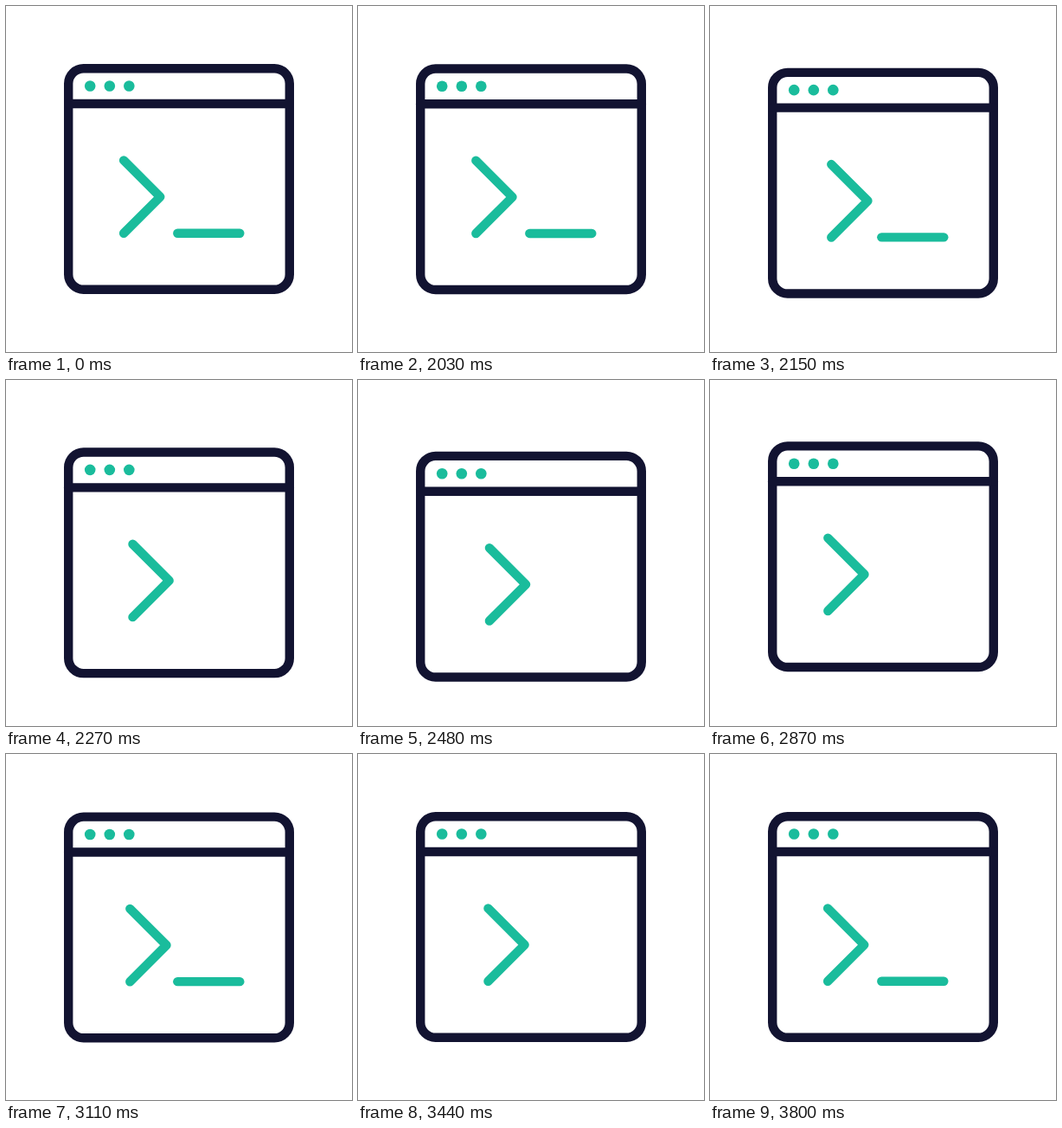
These frames come from a looping animation (400 by 400 pixels, 3.86 s). An HTML page:

```html
<!DOCTYPE html>
<html lang="en">
<head>
<meta charset="utf-8">
<title>Console</title>
<style>
  html, body { margin: 0; width: 100%; height: 100%; overflow: hidden; background: #fff; }
  svg { display: block; width: 100vw; height: 100vh; }
  .line { fill: none; stroke-width: 10.4; stroke-linecap: round; stroke-linejoin: round; }
  .dark { stroke: #121331; }
  .accent { stroke: #1abc9c; }
  .dots { fill: #1abc9c; }
</style>
</head>
<body>
<svg viewBox="0 0 400 400">
  <g id="console">
    <rect class="line dark" x="72.2" y="72.2" width="255.6" height="255.6" rx="17.5"/>
    <path class="line dark" d="M72.2 113H327.8"/>
    <g class="dots">
      <circle cx="97.2" cy="92.5" r="6.3"/>
      <circle cx="119.8" cy="92.5" r="6.3"/>
      <circle cx="142.3" cy="92.5" r="6.3"/>
    </g>
    <path id="prompt" class="line accent" d="M136.1 178.4L178.3 220.6L136.1 262.8"/>
    <path id="cursor" class="line accent" d="M198.3 262.7H270.3"/>
  </g>
</svg>
<script>
  const LOOP = 3860, REST = 2000, STEP = 30, LAST = 60;
  const TRAVEL = 16;
  const DROP = 14;      // steps until the window is lowest
  const RISE = 27.5;    // steps it takes to come back
  const SWING = 15;     // steps for the prompt to go one way
  const BLINK = 8.25;   // steps between cursor changes

  const byId = id => document.getElementById(id);
  const win = byId('console'), prompt = byId('prompt'), cursor = byId('cursor');

  const clamp = p => Math.min(1, Math.max(0, p));
  const smooth = p => p * p * (3 - 2 * p);

  // Cubic bezier easing with control points (x1, 0) and (x2, 1)
  function ease(p, x1, x2) {
    let lo = 0, hi = 1;
    for (let i = 0; i < 24; i++) {
      const s = (lo + hi) / 2, r = 1 - s;
      const x = 3 * r * r * s * x1 + 3 * r * s * s * x2 + s * s * s;
      if (x < p) lo = s; else hi = s;
    }
    return smooth(lo);
  }

  function windowY(k) {
    if (k <= DROP) return TRAVEL * smooth(k / DROP);
    return TRAVEL * (1 - ease(clamp((k - DROP) / RISE), 0.33, 0.4));
  }

  function promptX(k) {
    const phase = k / SWING % 2;
    return TRAVEL * smooth(1 - Math.abs(phase - 1));
  }

  const cursorOn = k => Math.floor(k / BLINK) % 2 === 0 || k >= LAST;

  function draw(now) {
    const t = now % LOOP;
    const k = Math.min(LAST, Math.max(0, Math.floor((t - REST) / STEP)));
    win.setAttribute('transform', `translate(0 ${windowY(k).toFixed(3)})`);
    prompt.setAttribute('transform', `translate(${promptX(k).toFixed(3)} 0)`);
    cursor.setAttribute('visibility', cursorOn(k) ? 'visible' : 'hidden');
  }

  const start = performance.now();
  function tick() {
    draw(performance.now() - start);
    requestAnimationFrame(tick);
  }
  tick();
</script>
</body>
</html>
```
